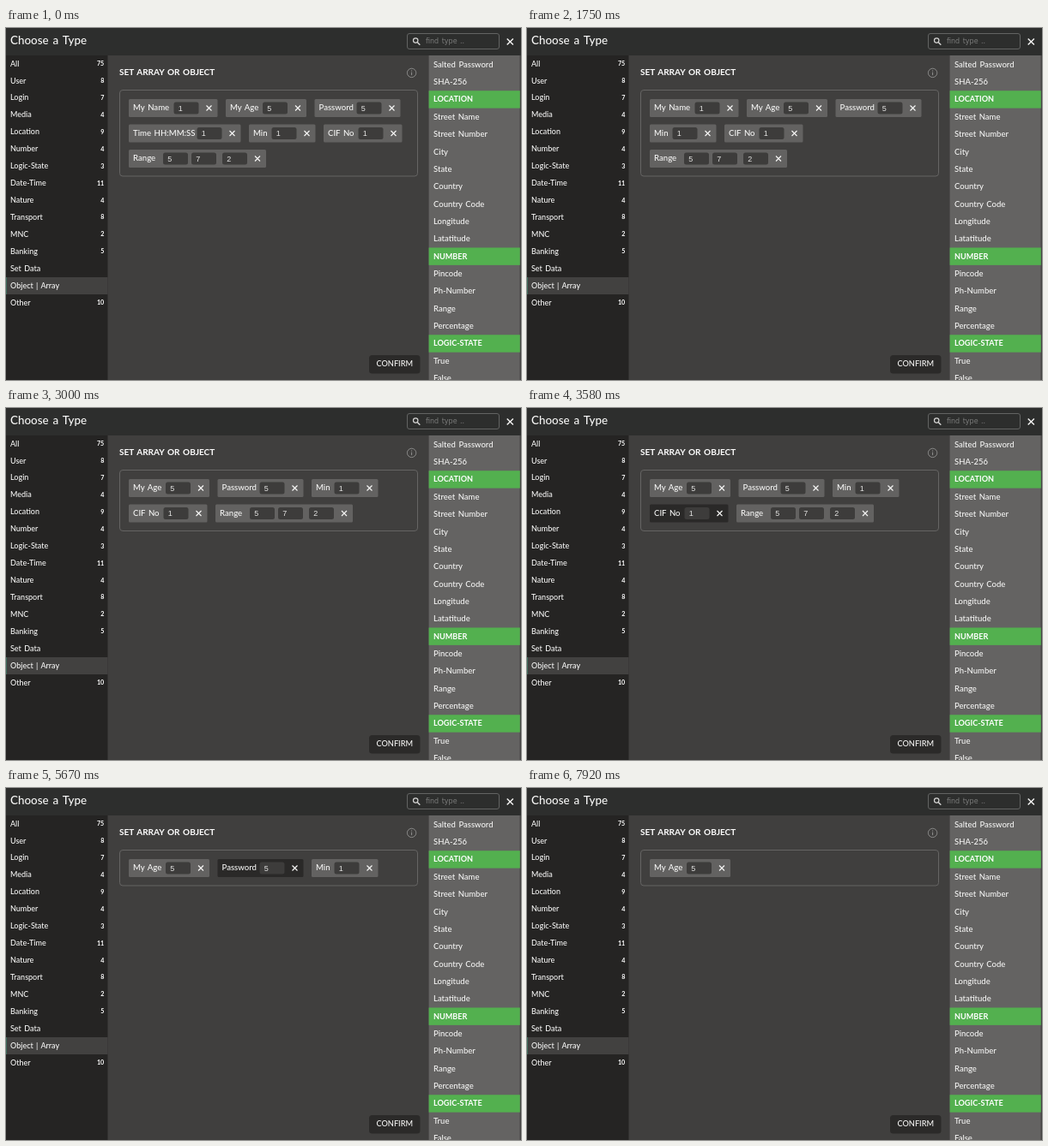
Animation of 600 by 411 pixels, one loop 8 s. Source, as an HTML page:

```html
<!DOCTYPE html>
<html lang="en">
<head>
<meta charset="utf-8">
<title>Choose a Type</title>
<style>
  html, body { margin: 0; width: 100%; height: 100%; overflow: hidden; background: #403f3e; }
  svg { display: block; width: 100vw; height: 100vh; }
  text { font-family: Lato, sans-serif; font-weight: 500; word-spacing: .12em; fill: #f6f6f5; white-space: pre; }
  .heading { font-weight: 700; fill: #fff; }
  .value { font: 9px "Liberation Sans", Arial, sans-serif; fill: #e4e4e3; }
  .hint { font: 8px "DejaVu Sans", sans-serif; fill: #7b7c7b; }
</style>
</head>
<body>
<svg viewBox="0 0 600 411"><g id="frame"></g><g id="chips"></g></svg>
<script>
const LOOP = 8000, FPS = 12;

const categories = [
  ['All', 75], ['User', 8], ['Login', 7], ['Media', 4], ['Location', 9], ['Number', 4],
  ['Logic-State', 3], ['Date-Time', 11], ['Nature', 4], ['Transport', 8], ['MNC', 2],
  ['Banking', 5], ['Set Data', ''], ['Object | Array', ''], ['Other', 10]
];
const types = [
  'Salted Password', 'SHA-256', 'LOCATION', 'Street Name', 'Street Number', 'City', 'State',
  'Country', 'Country Code', 'Longitude', 'Latatitude', 'NUMBER', 'Pincode', 'Ph-Number',
  'Range', 'Percentage', 'LOGIC-STATE', 'True', 'False'
];
const groups = ['LOCATION', 'NUMBER', 'LOGIC-STATE'];

// removed: step of deletion; hovers: [fade-in start, end, fade-out start, end] in steps
const chips = [
  { label: 'My Name', width: 103.5, values: [1], removed: 36, hovers: [[23, 26.2]] },
  { label: 'My Age', width: 94, values: [5], hovers: [[36, 38, 39.5, 43]] },
  { label: 'Password', width: 100, values: [5], removed: 71, hovers: [[65, 68]] },
  { label: 'Time HH:MM:SS', width: 130.5, values: [1], removed: 21, hovers: [[7.5, 10.5]] },
  { label: 'Min', width: 77.5, values: [1], removed: 91, hovers: [[78, 80]] },
  { label: 'CIF No', width: 91.5, values: [1], removed: 47, hovers: [[21, 24, 22, 25], [39.5, 43]] },
  { label: 'Range', width: 160, values: [5, 7, 2], removed: 59, hovers: [[47, 48]] }
];

const rect = (x, y, w, h, fill, r = 0, extra = '') =>
  `<rect x="${x}" y="${y}" width="${w}" height="${h}" rx="${r}" fill="${fill}" ${extra}/>`;
const text = (x, y, size, content, extra = '') =>
  `<text x="${x}" y="${y}" font-size="${size}" ${extra}>${content}</text>`;
const line = (d, width = 1.3, color = '#f6f6f5') =>
  `<path d="${d}" fill="none" stroke="${color}" stroke-width="${width}"/>`;
const cross = (x, y, r, width) =>
  line(`M${x - r} ${y - r}l${2 * r} ${2 * r}m0 ${-2 * r}l${-2 * r} ${2 * r}`, width);

function drawFrame() {
  let out = rect(0, 0, 600, 32, '#2d2e2d') + rect(0, 32, 118.5, 379, '#252423')
    + rect(492.6, 32, 106.2, 379, '#646362') + rect(598.8, 32, 1.2, 379, '#454443')
    + text(5, 19.3, 13.4, 'Choose a Type');

  out += rect(467.5, 6.5, 107, 18, 'none', 2.5, 'stroke="#636463"')
    + '<circle cx="477.2" cy="14.6" r="2.7" fill="none" stroke="#d5d5d4" stroke-width="1.2"/>'
    + line('M479.3 16.7l3 3', 1.4, '#d5d5d4')
    + text(489, 18.3, 8, 'find type ..', 'class="hint"')
    + cross(587.3, 16, 3.6, 1.4);

  out += rect(0, 291, 118.5, 20, '#424140') + rect(0, 291, 1, 20, '#3f6d5b');
  categories.forEach(([name, count], i) => {
    const y = 44.6 + i * 19.93;
    out += text(5, y, 9, name) + text(114.3, y - .5, 7.2, count, 'text-anchor="end" class="heading"');
  });

  types.forEach((name, i) => {
    const y = 42.3 + i * 20.36, isGroup = groups.includes(name);
    if (isGroup) out += rect(492.6, y - 9.8, 106.2, 20.4, '#53b04f');
    out += text(498, y + 3.4, isGroup ? 9.1 : 9.5, name, isGroup ? 'class="heading"' : '');
  });

  out += text(132, 54.5, 10, 'SET ARRAY OR OBJECT', 'class="heading"')
    + '<circle cx="472.6" cy="52.4" r="5.2" fill="none" stroke="#929291" stroke-width=".9"/>'
    + line('M472.6 51.6v3.6M472.6 49.4v1.1', 1, '#929291')
    + rect(423, 382, 59.5, 21.5, '#2b2a29', 3.5)
    + text(452.8, 395.3, 9.2, 'CONFIRM', 'text-anchor="middle"');
  return out;
}

const ramp = (step, from, to) => Math.min(1, Math.max(0, (step - from) / (to - from)));
const mix = (a, b, k) => Math.round(a + (b - a) * k);

function drawChip(chip, x, y, step) {
  const hover = chip.hovers.reduce((sum, [a, b, c = 1e3, d = 1e4]) =>
    sum + ramp(step, a, b) - ramp(step, c, d), 0);
  const fill = `rgb(${[[99, 42], [98, 41], [97, 40]].map(([a, b]) => mix(a, b, hover))})`;
  const last = x + chip.width - 51;
  const offsets = chip.values.length > 1 ? [-69, -36, 0] : [0];
  let out = rect(x, y, chip.width, 21, fill, 1.5) + text(x + 5, y + 13.4, 9.6, chip.label);
  chip.values.forEach((value, i) => {
    const left = last + offsets[i];
    out += rect(left, y + 3.5, 29, 14, '#3d3c3b', 2.5)
      + text(left + 5.2, y + 13.5, 9, value, 'class="value"');
  });
  return out + cross(x + chip.width - 10, y + 10.5, 3, 1.15);
}

function drawChips(step) {
  let x = 143, y = 83, out = '';
  for (const chip of chips) {
    if (step >= chip.removed) continue;
    if (x + chip.width > 470) { x = 143; y += 29.5; }
    out += drawChip(chip, x, y, step);
    x += chip.width + 9.5;
  }
  return rect(132.5, 72.5, 347, y - 41.5, 'none', 3.5, 'stroke="#656463"') + out;
}

const chipLayer = document.getElementById('chips');
document.getElementById('frame').innerHTML = drawFrame();

let shown = -1;
function render(now) {
  // the small offset absorbs time stamps rounded to 10 ms
  const step = Math.floor((now % LOOP + 4) * FPS / 1000) % (LOOP * FPS / 1000);
  if (step !== shown) chipLayer.innerHTML = drawChips(shown = step);
  requestAnimationFrame(render);
}
render(0);
</script>
</body>
</html>
```
